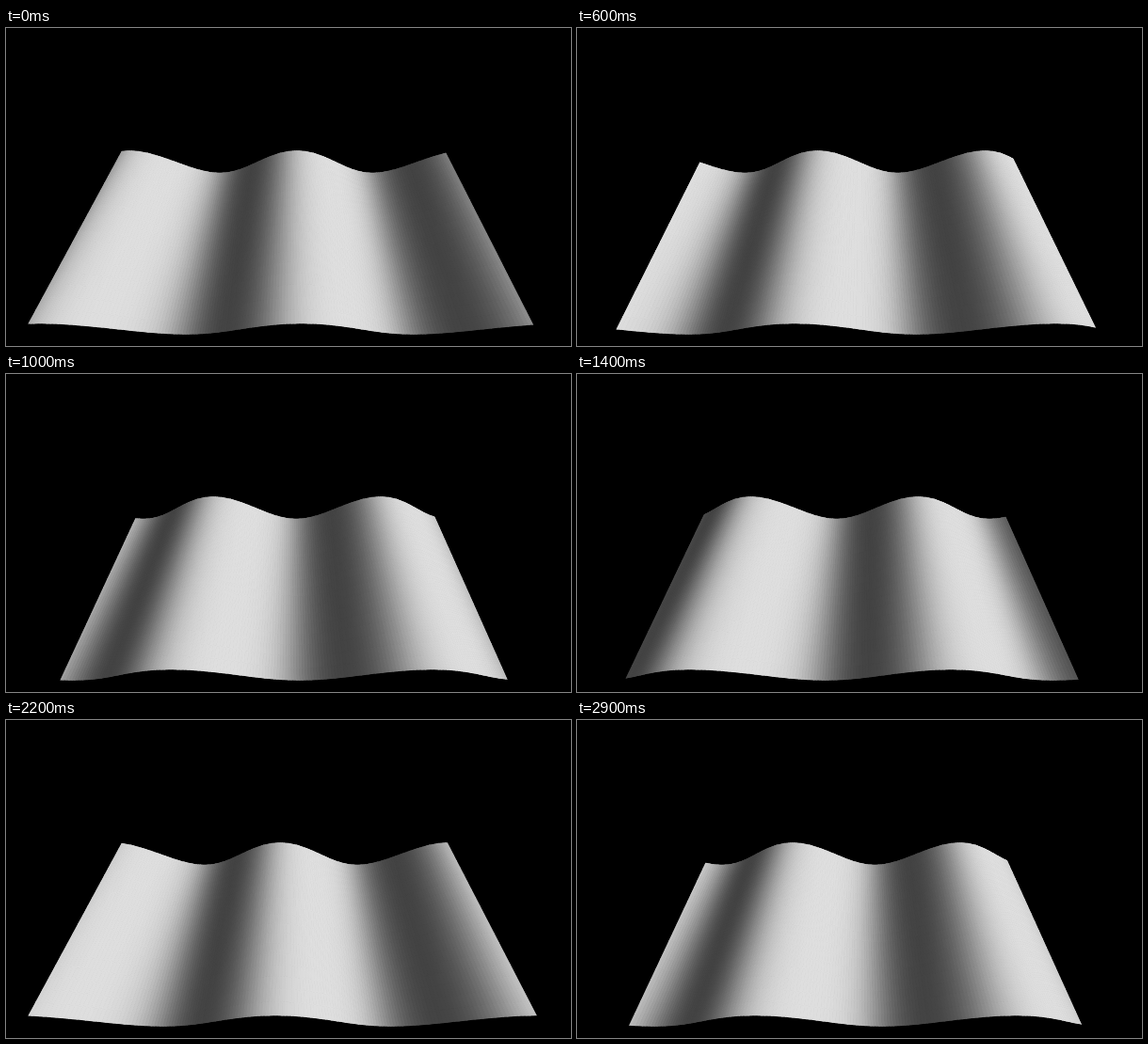
These frames come from a looping animation (600 px wide and 338 px high, 3000 ms). An HTML page with a canvas:

```html
<!DOCTYPE html>
<html lang="en">
<head>
<meta charset="utf-8">
<title>Wave sheet</title>
<style>
  html, body { margin: 0; width: 100%; height: 100%; overflow: hidden; background: #000; }
  canvas { display: block; }
</style>
</head>
<body>
<canvas id="stage" width="600" height="338"></canvas>
<script>
const WIDTH = 600, HEIGHT = 338;
const LOOP = 3000, STEP = 100;
const COLS = 40, ROWS = 20, CELL = 0.05, SPLIT = 4;
const AMPLITUDE = 0.1;

// Camera 1.25 above the sheet, looking down, 60 degree vertical field of view
const CAMERA = { y: -0.75, z: 1.25 };
const FOCAL = HEIGHT / 2 / Math.tan(Math.PI / 6);
const PITCH = Math.atan(1.25);
const SIN = Math.sin(PITCH), COS = Math.cos(PITCH);

const ctx = document.getElementById('stage').getContext('2d');

const gridX = i => -1 + i * CELL;
const gridY = j => -0.5 + j * CELL;
const lerp = (a, b, k) => a + (b - a) * k;

function project(x, y, z) {
  const dy = y - CAMERA.y, dz = z - CAMERA.z;
  const scale = FOCAL / (dy * COS - dz * SIN);
  return [WIDTH / 2 + x * scale, HEIGHT / 2 - (dy * SIN + dz * COS) * scale];
}

function wavePhase(x, seconds) {
  return 2 * Math.PI * x + Math.PI * (seconds - 0.1);
}

// Heights are linear between mesh vertices
function heightAt(column, seconds) {
  const i = Math.floor(column);
  const vertex = n => AMPLITUDE * Math.cos(wavePhase(gridX(n), seconds));
  return lerp(vertex(i), vertex(i + 1), column - i);
}

// Diffuse light falling from the upper right
function shade(x, row, seconds) {
  const lead = lerp(0.06, 0.03, row / (ROWS - 1));
  const slope = -2 * Math.PI * AMPLITUDE * Math.sin(wavePhase(x + lead, seconds));
  const diffuse = (1 - slope) / Math.sqrt(2 * (1 + slope * slope));
  const level = Math.round(21.5 + 206 * diffuse);
  return `rgb(${level},${level},${level})`;
}

function trace(points) {
  ctx.beginPath();
  points.forEach(([x, y]) => ctx.lineTo(x, y));
  ctx.closePath();
}

function draw(seconds) {
  ctx.fillStyle = '#000';
  ctx.fillRect(0, 0, WIDTH, HEIGHT);

  const columns = [];
  for (let n = 0; n <= (COLS - 1) * SPLIT; n++) {
    const x = gridX(n / SPLIT), z = heightAt(n / SPLIT, seconds);
    const points = [];
    for (let j = 0; j < ROWS; j++) points.push(project(x, gridY(j), z));
    columns.push(points);
  }

  ctx.save();
  const front = columns.map(points => points[0]);
  const back = columns.map(points => points[ROWS - 1]);
  trace([...front, ...back.reverse()]);
  ctx.clip();
  ctx.lineWidth = 1;

  for (let j = ROWS - 2; j >= 0; j--) {
    for (let n = 0; n < columns.length - 1; n++) {
      const left = columns[n], right = columns[n + 1];
      const color = shade(gridX((n + 0.5) / SPLIT), j + 0.5, seconds);
      trace([left[j], right[j], right[j + 1], left[j + 1]]);
      ctx.fillStyle = ctx.strokeStyle = color;
      ctx.fill();
      ctx.stroke();
    }
  }
  ctx.restore();
}

let shown = -1;
function tick() {
  const step = Math.floor((performance.now() % LOOP) / STEP);
  if (step !== shown) {
    shown = step;
    draw(step * STEP / 1000);
  }
  requestAnimationFrame(tick);
}
tick();
</script>
</body>
</html>
```
